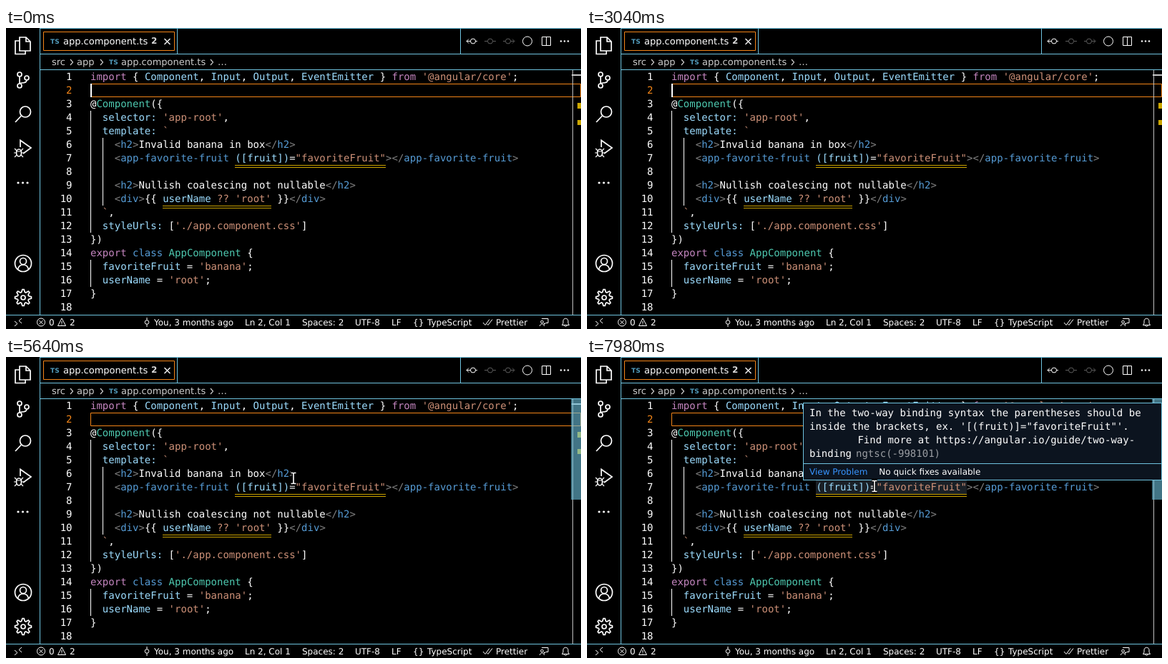
An HTML page that plays this animation: 804 by 422 pixels, repeating every 8000 ms.

```html
<!DOCTYPE html>
<html lang="en">
<head>
<meta charset="utf-8">
<title>Editor diagnostics</title>
<style>
html, body { margin: 0; width: 100%; height: 100%; overflow: hidden; background: #000; }
body { position: relative; color: #fff; text-rendering: geometricPrecision; font-family: "DejaVu Sans", sans-serif; }
body > * { position: absolute; }
svg { left: 0; top: 0; }
svg text { stroke: none; white-space: pre; }
pre { margin: 0; font: 14px/19px "DejaVu Sans Mono", monospace; }
b { font-weight: normal; }
.k { color: #c586c0; }
.v { color: #9cdcfe; }
.s { color: #ce9178; }
.t { color: #569cd6; }
.g { color: #808080; }
.c { color: #4ec9b0; }
.a { color: #f38518; }
#nums { right: calc(100% - 92.5px); top: 60px; text-align: right; }
#code { left: 118px; top: 60px; }
#mark { left: 320px; top: 173px; width: 211px; height: 19px; background: #1a2026; }
#caret { left: 118px; top: 78px; width: 2px; height: 19px; background: #fff; }
#slider { left: 790px; top: 59px; width: 14px; height: 141px; background: rgba(111, 195, 223, .6); }
#tip { left: 302px; top: 64px; width: 502px; height: 109px; box-sizing: border-box; border: 1px solid #6fc3df; background: #0c141f; }
#tip pre { padding: 5px 8px 3px; border-bottom: 1px solid #6fc3df; }
#tip .n { margin-left: 6px; color: #9a9da2; }
#tip div { padding-left: 8px; font-size: 12px; line-height: 22px; white-space: nowrap; }
#tip .l { color: #3794ff; margin-right: 16px; }
</style>
</head>
<body>
<svg id="ui" width="804" height="422" fill="none" stroke="#fff">
  <path stroke="#6fc3df" d="M47 .5H804M47.5 0V402M0 402.5H804M48 36.5H804M48 58.5H804M239.5 0V36M635.5 0V36"/>
  <path stroke="#f38518" d="M52.5 5.5h183v26h-183zM118.5 78.5h685v18h-685z"/>
  <path d="M118.5 116V287M135.5 154V249M118.5 325V363"/>
  <path stroke="#cca300" d="M320 192.5H531M320 195.5H531M219 249.5H371M219 252.5H371"/>
  <path stroke="#c0c0c0" d="M792.5 59V402"/>
  <path stroke="#c8c8c8" stroke-width="2" d="M791 66H804"/>
  <path fill="#cca700" stroke="none" d="M799 105h5v8h-5zM799 129h5v7h-5z"/>

  <!-- activity bar -->
  <g stroke-width="1.7">
    <path d="M19 13h9l6 6v13H19zM28 13v6h6M19 18h-6v18.500h14v-4"/>
    <circle cx="19" cy="65" r="3"/><circle cx="29" cy="70" r="3"/><circle cx="19" cy="81" r="3"/>
    <path d="M19 68v10M29 73c0 4-4 4-7 4s-3 1-3 1"/>
    <circle cx="27" cy="117.500" r="7.500"/><path d="M21.500 123L13 132"/>
    <path d="M20 167V157.500L35 168L24 176"/>
    <ellipse cx="18" cy="175" rx="3.500" ry="5"/><path d="M14.500 173h7M12 169l3 3M24 169l-3 3M11 175h3M22 175h3M12 181l3-3M24 181l-3-3" stroke-width="1.200"/>
    <circle cx="24" cy="330" r="11.500"/><circle cx="24" cy="327" r="4.500"/>
    <path d="M16.500 338.500c1-5 4-6.500 7.500-6.500s6.500 1.500 7.500 6.500"/>
    <path id="gear"/><circle cx="24" cy="378" r="3"/>
  </g>
  <g fill="#fff" stroke="none">
    <circle cx="17" cy="217" r="1.600"/><circle cx="23.500" cy="217" r="1.600"/><circle cx="30" cy="217" r="1.600"/>
    <circle cx="776" cy="18.500" r="1.200"/><circle cx="781" cy="18.500" r="1.200"/><circle cx="786" cy="18.500" r="1.200"/>
  </g>

  <!-- tab and breadcrumb -->
  <path stroke-width="1.300" d="M221.500 15l8 8M229.500 15l-8 8"/>
  <path stroke="#ccc" stroke-width="1.200" d="M90 44l3.500 4-3.500 4M132 44l3.500 4-3.500 4M286 44l3.500 4-3.500 4"/>

  <!-- editor actions -->
  <path d="M650 18.500h-6M647 15.500l-3 3 3 3M656 18.500h3"/><circle cx="653" cy="18.500" r="3.500"/>
  <g stroke="#5c5c5c">
    <circle cx="677" cy="18.500" r="3.500"/><path d="M669 18.500h4.500M680.500 18.500h4.500"/>
    <circle cx="702" cy="18.500" r="3.500"/><path d="M695 18.500h3.500M705.500 18.500h5M708 15.500l3 3-3 3"/>
  </g>
  <circle cx="729" cy="18.500" r="6.500"/>
  <path d="M749.500 12.500h12v12h-12zM755.500 12.500v12"/>

  <!-- status bar -->
  <path d="M12 411l4 3.500-4 3.500M22 407l-4 3.500 4 3.500"/>
  <circle cx="49" cy="412.500" r="5.500"/><path d="M46.500 410l5 5M51.500 410l-5 5"/>
  <path d="M78 407l5.500 10.500h-11zM78 411v3.500M78 415.500v1"/>
  <circle cx="197" cy="412.500" r="2.800"/><path d="M197 406v3.500M197 415.500v3.500"/>
  <path d="M667 413l3 3.500 6-8M672.500 415l1.500 1.500 6-8"/>
  <path d="M749 407.500h9v6h-3l-2.500 2v-2M746.500 418c0-4 6-4 6 0"/><circle cx="749.500" cy="412" r="1.800"/>
  <path d="M777.500 416.500h10l-1.500-2.500v-3c0-5-7-5-7 0v3zM781 417c0 2 3 2 3 0"/>
</svg>
<div id="mark"></div>
<pre id="nums"></pre>
<pre id="code">
<b class="k">import</b> { <b class="v">Component</b>, <b class="v">Input</b>, <b class="v">Output</b>, <b class="v">EventEmitter</b> } <b class="k">from</b> <b class="s">'@angular/core'</b>;

@<b class="c">Component</b>({
  <b class="v">selector:</b> <b class="s">'app-root'</b>,
  <b class="v">template:</b> <b class="s">`</b>
    <b class="g">&lt;</b><b class="t">h2</b><b class="g">&gt;</b>Invalid banana in box<b class="g">&lt;/</b><b class="t">h2</b><b class="g">&gt;</b>
    <b class="g">&lt;</b><b class="t">app-favorite-fruit</b> <b class="v">([fruit])</b>=<b class="s">"favoriteFruit"</b><b class="g">&gt;&lt;/</b><b class="t">app-favorite-fruit</b><b class="g">&gt;</b>

    <b class="g">&lt;</b><b class="t">h2</b><b class="g">&gt;</b>Nullish coalescing not nullable<b class="g">&lt;/</b><b class="t">h2</b><b class="g">&gt;</b>
    <b class="g">&lt;</b><b class="t">div</b><b class="g">&gt;</b>{{ <b class="v">userName</b> <b class="s">??</b> <b class="s">'root'</b> }}<b class="g">&lt;/</b><b class="t">div</b><b class="g">&gt;</b>
  <b class="s">`</b>,
  <b class="v">styleUrls:</b> [<b class="s">'./app.component.css'</b>]
})
<b class="k">export</b> <b class="t">class</b> <b class="c">AppComponent</b> {
  <b class="v">favoriteFruit</b> = <b class="s">'banana'</b>;
  <b class="v">userName</b> = <b class="s">'root'</b>;
}
</pre>
<div id="caret"></div>
<div id="slider"></div>
<div id="tip"><pre>In the two-way binding syntax the parentheses should be
inside the brackets, ex. '[(fruit)]="favoriteFruit"'.
        Find more at https://angular.io/guide/two-way-
binding<b class="n">ngtsc(-998101)</b></pre><div><b class="l">View Problem</b>No quick fixes available</div></div>
<svg id="mouse" width="20" height="24" viewBox="-10 -12 20 24" fill="none">
  <path stroke="#000" stroke-width="4" d="M-4 -8.500h8M0 -8v16M-4 8.500h8"/>
  <path stroke="#fff" stroke-width="1.600" d="M-3.500 -7.500h2.500l1 1 1 -1h2.500M0 -7v14M-3.500 7.500h2.500l1 -1 1 1h2.500"/>
</svg>
<script>
const $ = id => document.getElementById(id);
const clamp = x => Math.max(0, Math.min(1, x));

const label = (x, y, size, str, color = '#fff', weight = 400) =>
  $('ui').insertAdjacentHTML('beforeend',
    `<text x="${x}" y="${y}" font-size="${size}" font-weight="${weight}" fill="${color}">${str}</text>`);

label(62, 22, 9, 'TS', '#519aba', 700);
label(80, 23, 13, 'app.component.ts');
label(203, 22, 12, '2', '#d8d8d8', 700);
label(144, 51, 9, 'TS', '#519aba', 700);
[[64, 'src'], [99, 'app'], [161, 'app.component.ts'], [296, '…']]
  .forEach(([x, s]) => label(x, 52, 13, s, '#ccc'));
[[60, '0'], [89, '2'], [207, 'You, 3 months ago'], [334, 'Ln 2, Col 1'], [414, 'Spaces: 2'],
 [488, 'UTF-8'], [539, 'LF'], [569, '{}'], [589, 'TypeScript'], [685, 'Prettier']]
  .forEach(([x, s]) => label(x, 417, 12, s));

$('nums').innerHTML = Array.from({ length: 18 }, (_, i) =>
  i === 1 ? '<b class="a">2</b>' : i + 1).join('\n');

$('gear').setAttribute('d', 'M' + Array.from({ length: 32 }, (_, i) => {
  const r = i % 4 < 2 ? 11.5 : 8, a = (i - 0.5) * Math.PI / 16;
  return `${24 + r * Math.cos(a)} ${378 + r * Math.sin(a)}`;
}).join('L') + 'z');

// Caret flips at each of these times, starting visible.
const flips = [40, 580, 1040, 1620, 2060, 2440, 3060, 3500, 4060, 4500,
               5060, 5670, 6060, 6500, 7020, 7500, 7980];
// Pointer path: time, x, y.
const path = [[4790, 440, 440], [4890, 433, 344], [5640, 402, 170], [6110, 402, 181]];

function pointer(t) {
  const i = path.findIndex(p => p[0] > t);
  if (i < 0) return path[path.length - 1].slice(1);
  if (i === 0) return null;
  const [t0, x0, y0] = path[i - 1], [t1, x1, y1] = path[i];
  const u = (t - t0) / (t1 - t0), e = u * (2 - u);
  return [x0 + (x1 - x0) * e, y0 + (y1 - y0) * e];
}

function draw() {
  const t = performance.now() % 8000;
  $('caret').style.opacity = flips.filter(f => f <= t).length % 2 ? 0 : 1;
  $('slider').style.opacity = clamp((t - 4850) / 90);
  $('mark').style.opacity = t >= 6820 ? 1 : 0;
  $('tip').style.opacity = t >= 7020 ? 1 : 0.8 * clamp((t - 6820) / 100);
  const p = pointer(t), m = $('mouse').style;
  m.opacity = p ? 1 : 0;
  if (p) m.transform = `translate(${Math.round(p[0]) - 10}px, ${Math.round(p[1]) - 12}px)`;
  requestAnimationFrame(draw);
}
draw();
</script>
</body>
</html>
```
